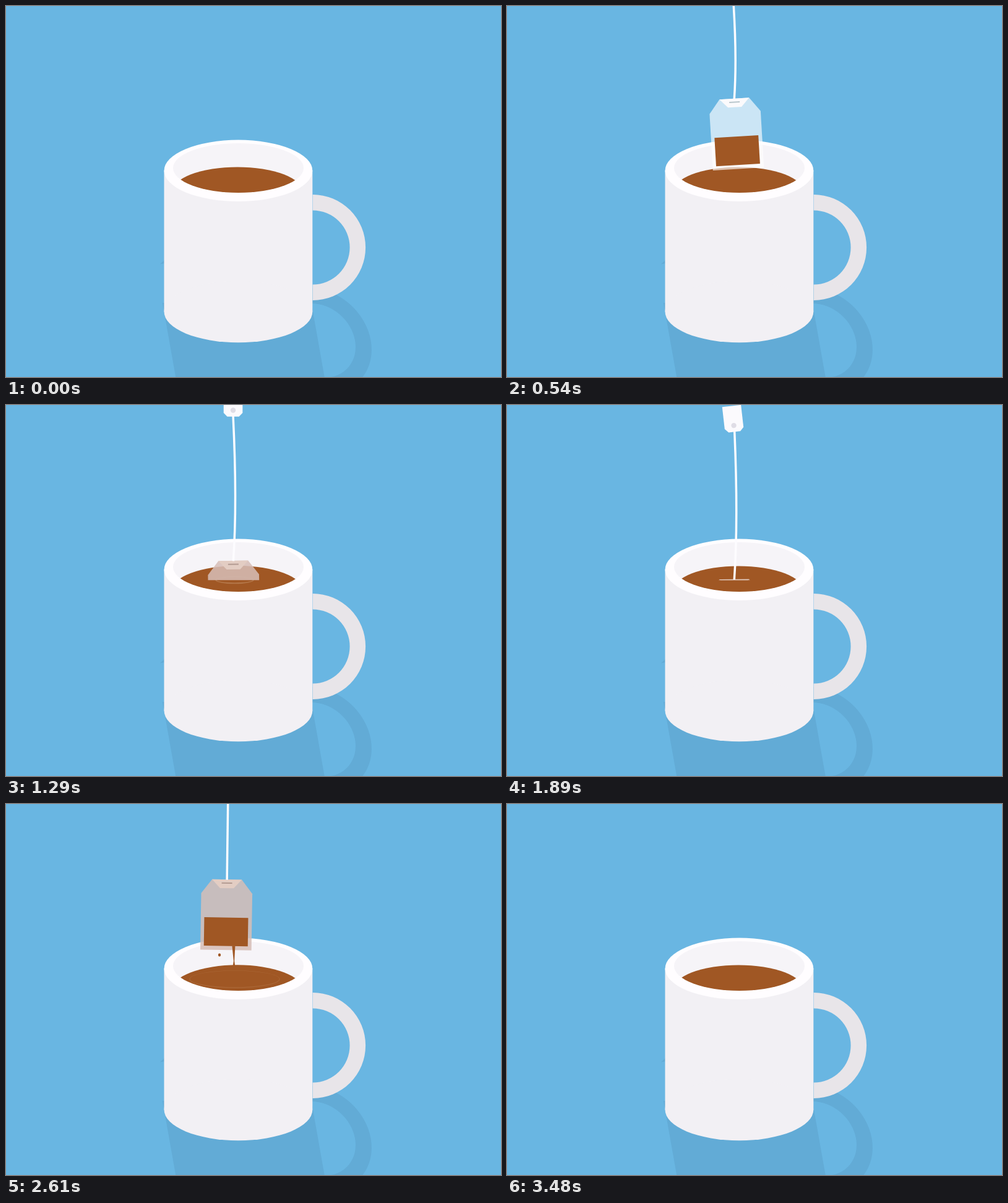
Write an HTML page with a canvas that moves like this. It is 800 px wide and 600 px high and loops after 3600 ms.

```html
<!DOCTYPE html>
<html lang="en">
<head>
<meta charset="utf-8">
<title>Tea time</title>
<style>
  html, body { margin: 0; width: 100%; height: 100%; overflow: hidden; background: #69b6e2; }
  canvas { display: block; }
</style>
</head>
<body>
<canvas id="stage" width="800" height="600"></canvas>
<script>
const ctx = document.getElementById('stage').getContext('2d');
const LOOP = 3600, STEP = 30, TAU = Math.PI * 2, WATER = 283.3;
const BAG_IN = 240, BAG_OUT = 2940, WET_AT = 640;

const C = {
  sky: '#69b6e2', shade: '#62abd6', mug: '#f2f0f4', rim: '#fffdff',
  inner: '#f6f4f8', handle: '#e8e5e9', tea: '#a05724', ring: '#b37547',
  cord: '#fdfcff', tag: '#fbfafd', hole: '#dfdde6'
};
const DRY = { body: 'rgba(255,255,255,.65)', flap: '#fbfafc', staple: '#b9c6cc' };
const WET = { body: 'rgba(215,190,183,.86)', flap: '#e3cdc3', staple: '#b39b92' };

// Ripples: plunge, bob, pull out, last drop
const RIPPLES = [
  { at: 570, size: 85 }, { at: 1181, size: 66 },
  { at: 2360, size: 85 }, { at: 2823, size: 62 }
];

const span = (t, from, to) => Math.min(1, Math.max(0, (t - from) / (to - from)));
const rad = deg => deg * Math.PI / 180;

// Plunge, one bob, then pulled out; the sideways swing dies away
function pose(t) {
  const plunge = 1 - (1 - span(t, 240, 780)) ** 1.286;
  const bob = Math.sin(Math.PI * span(t, 1075, 1982)) ** 2;
  const lift = span(t, 2300, 2910);
  const swing = Math.exp((540 - t) / 300);
  const y = -108 + 398 * plunge - 83 * bob - 402 * lift ** 1.29;
  return {
    x: 367.3 - 20 * lift,
    y,
    tilt: 2 * lift - 3.4 * Math.sqrt(swing),
    tagX: 367.8 - 9.2 * swing - 15 * lift,
    tagY: y - 240 + 15 * bob,
    tagTilt: -6.5 * Math.sin(TAU * (t - 1290) / 2400),
    bow: 3.2 + 2.2 * swing - 6.3 * lift
  };
}

function poly(color, ...pts) {
  ctx.fillStyle = color;
  ctx.beginPath();
  for (let i = 0; i < pts.length; i += 2) ctx.lineTo(pts[i], pts[i + 1]);
  ctx.fill();
}

function oval(color, x, y, rx, ry) {
  ctx.fillStyle = color;
  ctx.beginPath();
  ctx.ellipse(x, y, rx, ry, 0, 0, TAU);
  ctx.fill();
}

function placed(x, y, tilt, paint) {
  ctx.save();
  ctx.translate(x, y);
  ctx.rotate(rad(tilt));
  paint();
  ctx.restore();
}

function handle(color, x, y) {
  ctx.fillStyle = color;
  ctx.beginPath();
  ctx.arc(x, y, 85.5, -Math.PI / 2, Math.PI / 2);
  ctx.arc(x, y, 60, Math.PI / 2, -Math.PI / 2, true);
  ctx.fill();
}

function shadow() {
  const lean = .177;
  ctx.save();
  ctx.transform(1, 0, lean, 1, -500 * lean, 0);
  ctx.fillStyle = C.shade;
  ctx.fillRect(256.5, 480, 240.5, 130);
  handle(C.shade, 496.8, 541);
  ctx.restore();
  poly(C.shade, 249, 417.5, 257, 410, 257, 416);
}

function mug() {
  const x = 375.4, rx = 119.9, ry = 49.7;
  handle(C.handle, 495.6, 390.5);
  ctx.fillStyle = C.mug;
  ctx.fillRect(x - rx, 266, 2 * rx, 228.5);
  oval(C.mug, x, 494.5, rx, ry);
  oval(C.rim, x, 266.3, rx, ry);
  oval(C.inner, 375.5, 262, 105.5, 40);
}

function ripple(age, size) {
  const p = age / 400;
  if (p <= 0 || p >= 1) return;
  const rx = size * (1 - (1 - p) ** 2), ry = rx * .195;
  const w = Math.min(ry * .6, 1.7 * (1 - p) + .3);
  ctx.globalAlpha = Math.min(1, (1 - p) * 1.5);
  ctx.fillStyle = C.ring;
  ctx.beginPath();
  ctx.ellipse(369.5, WATER, rx, ry, 0, 0, TAU);
  ctx.ellipse(369.5, WATER - w * .4, Math.max(0, rx - w), ry - w, 0, 0, TAU);
  ctx.fill('evenodd');
  ctx.globalAlpha = 1;
}

function tea(t) {
  let swell = 0;
  for (const { at } of RIPPLES) {
    const p = span(t, at, at + 400);
    swell += 6 * p * (1 - p) ** 3;
  }
  ctx.save();
  ctx.beginPath();
  ctx.ellipse(375.5, 262, 105.5, 40, 0, 0, TAU);
  ctx.clip();
  oval(C.tea, 374, 301 - swell, 106, 40.5);
  for (const { at, size } of RIPPLES) ripple(t - at, size);
  ctx.restore();
}

function bag(t, p) {
  const look = t < WET_AT ? DRY : WET;
  ctx.save();
  ctx.beginPath();
  ctx.rect(0, 0, 800, WATER);
  ctx.clip();

  placed(p.x, p.y, p.tilt, () => {
    poly(look.body, -24, 0, 24, 0, 41.3, 22.5, 41.3, 114, -41.3, 114, -41.3, 22.5);
    poly(look.flap, -24, 0, 24, 0, 11, 14, -11, 14);
    ctx.fillStyle = look.staple;
    ctx.fillRect(-8.5, 4.8, 17, 1.9);
    ctx.fillStyle = C.tea;
    ctx.fillRect(-35.7, 61.5, 71, 46);
  });

  ctx.strokeStyle = C.cord;
  ctx.lineWidth = 3.5;
  ctx.beginPath();
  ctx.moveTo(p.tagX, p.tagY - 1);
  ctx.quadraticCurveTo((p.tagX + p.x) / 2 + 2 * p.bow, p.tagY * .4 + p.y * .6, p.x, p.y + .5);
  ctx.stroke();

  placed(p.tagX, p.tagY, p.tagTilt, () => {
    poly(C.tag, -15.3, -42, 15.3, -42, 15.3, -6, 9.5, 0, -9.5, 0, -15.3, -6);
    oval(C.hole, 0, -10.3, 4.2, 4.2);
  });
  ctx.restore();
}

function drop(t, from, x, y, rx, ry, pull) {
  const fall = y + pull * (t - from) ** 2;
  if (t > from && fall < WATER) oval(C.tea, x, fall, rx, ry);
}

function drips(t, top) {
  const y = top + 107.5;
  if (t >= 2500 && t <= 2640 && y < 262) {
    const w = Math.max(.5, 1.2 - (t - 2600) / 70) / 2;
    poly(C.tea, 365.4, y, 370.4, y, 368.6 + w, 254, 370.4, 263, 366.4, 263, 368.4 - w, 254);
  }
  drop(t, 2540, 345, 235.3, 2.2, 2.6, .0018);
  drop(t, 2640, 368.5, 200, 2, 5, .0025);
}

function draw(t) {
  ctx.fillStyle = C.sky;
  ctx.fillRect(0, 0, 800, 600);
  shadow();
  mug();
  tea(t);
  if (t < BAG_IN || t >= BAG_OUT) return;
  const p = pose(t);
  bag(t, p);
  drips(t, p.y);
}

let begin;
function tick(now) {
  begin ??= now;
  draw(Math.floor((now - begin) % LOOP / STEP) * STEP);
  requestAnimationFrame(tick);
}
draw(0);
requestAnimationFrame(tick);
</script>
</body>
</html>
```
